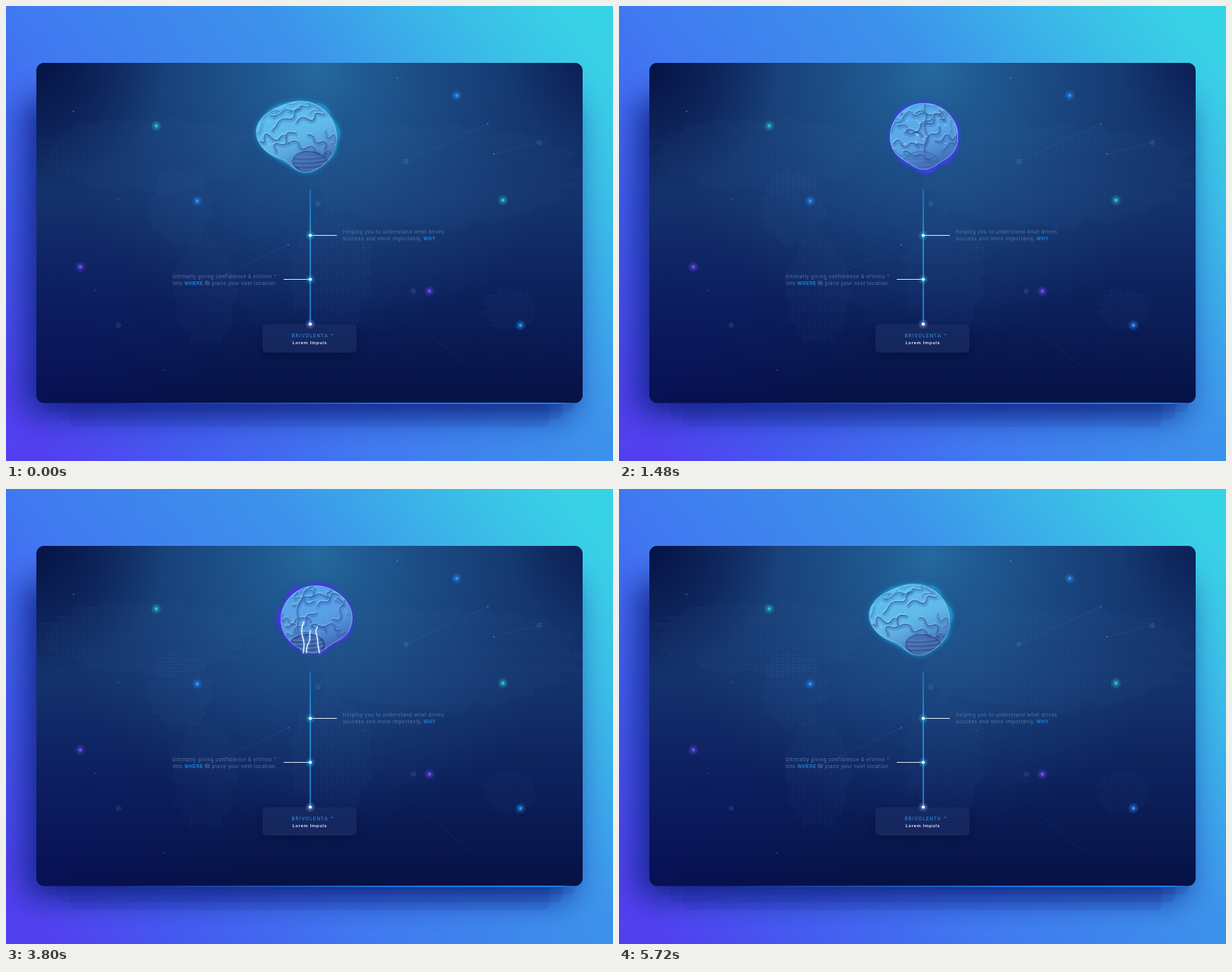
An HTML page with a canvas that plays this animation: 800x600 px, repeating every 5.76 s.

```html
<!DOCTYPE html>
<html lang="en">
<head>
<meta charset="utf-8">
<title>Brain timeline</title>
<style>
html, body { margin: 0; width: 100%; height: 100%; overflow: hidden; background: #3e80f0; }
canvas, svg { position: absolute; left: 0; top: 0; width: 800px; height: 600px; }
text { font-family: Roboto, Arial, sans-serif; font-size: 6.5px; letter-spacing: .63px; fill: #58749f; white-space: pre; }
.key { fill: #1f8ae0; font-weight: 500; }
.title { fill: #2b8fe8; letter-spacing: 1.05px; }
.sub { fill: #eef3ff; font-size: 6px; font-weight: 500; letter-spacing: .75px; }
</style>
</head>
<body>
<canvas id="stage" width="800" height="600"></canvas>
<svg viewBox="0 0 800 600">
  <text x="444" y="300">Helping you to understand what drives</text>
  <text x="444" y="309">success and more importanly, <tspan class="key">WHY</tspan></text>
  <text x="219.5" y="358.5">Ultimatly giving confidience &amp; elVirno ™</text>
  <text x="219.5" y="367.5">into <tspan class="key">WHERE</tspan> to place your next location.</text>
  <text class="title" x="376.5" y="437">BRIVOLENTA ™</text>
  <text class="sub" x="377.5" y="446.3">Lorem Impuls</text>
</svg>
<script>
const LOOP = 5760, TAU = Math.PI * 2, DEG = Math.PI / 180;
const ctx = document.getElementById('stage').getContext('2d');

const rgba = (c, a = 1) => `rgba(${c.map(Math.round).join(',')},${a})`;
const mix = (a, b, k) => a.map((v, i) => v + (b[i] - v) * k);

function seeded(seed) {
  return () => (seed = (seed * 16807) % 2147483647) / 2147483647;
}

function layer(w, h) {
  const c = document.createElement('canvas');
  c.width = w;
  c.height = h;
  return c;
}

function fade(g, stops) {
  stops.forEach(([at, color]) => g.addColorStop(at, color));
  return g;
}

const radial = (c, x, y, r, stops) => fade(c.createRadialGradient(x, y, 0, x, y, r), stops);
const linear = (c, x0, y0, x1, y1, stops) => fade(c.createLinearGradient(x0, y0, x1, y1), stops);

function disc(c, x, y, r, fill) {
  c.fillStyle = fill;
  c.beginPath();
  c.arc(x, y, r, 0, TAU);
  c.fill();
}

function glow(c, x, y, r, color, strength = 1) {
  disc(c, x, y, r, radial(c, x, y, r, [
    [0, rgba(color, strength)], [.35, rgba(color, .5 * strength)], [1, rgba(color, 0)]
  ]));
}

function box(c, x, y, w, h, r, fill) {
  c.fillStyle = fill;
  c.beginPath();
  c.roundRect(x, y, w, h, r);
  c.fill();
}

function segment(c, x0, y0, x1, y1, style, width) {
  c.strokeStyle = style;
  c.lineWidth = width;
  c.beginPath();
  c.moveTo(x0, y0);
  c.lineTo(x1, y1);
  c.stroke();
}

// ---- static scene ----

function drawBackdrop(c) {
  c.fillStyle = linear(c, 760, 30, 60, 590, [
    [0, 'rgb(56,210,230)'], [.12, 'rgb(58,191,231)'], [.34, 'rgb(60,147,235)'],
    [.64, 'rgb(64,120,241)'], [.85, 'rgb(68,90,240)'], [1, 'rgb(82,64,240)']
  ]);
  c.fillRect(0, 0, 800, 600);

  // the caster stays off stage, only its shadow is seen
  c.save();
  c.shadowColor = 'rgba(14,30,130,.85)';
  c.shadowBlur = 42;
  c.shadowOffsetX = 2000;
  box(c, 24 - 2000, 122, 722, 418, 16, '#000');
  c.restore();
  for (let i = 0; i < 3; i++) box(c, 50 + i * 17, 500, 700 - i * 34, 35 + i * 10, 8, 'rgba(14,30,120,.1)');
}

// continents: ragged ellipses of dots
function drawMap(c) {
  const cell = layer(3, 3);
  const p = cell.getContext('2d');
  p.fillStyle = 'rgba(100,160,215,.13)';
  p.fillRect(0, 0, 1.4, 1.4);
  c.fillStyle = c.createPattern(cell, 'repeat');
  const lands = [[185, 195, 140, 48], [230, 265, 42, 48], [262, 378, 42, 72],
                 [428, 350, 52, 80], [575, 222, 180, 68], [665, 400, 34, 27]];
  const rand = seeded(77);
  for (const [x, y, rx, ry] of lands) {
    c.beginPath();
    for (let a = 0; a < TAU; a += .12) {
      const k = .88 + .24 * rand();
      c.lineTo(x + Math.cos(a) * rx * k, y + Math.sin(a) * ry * k);
    }
    c.fill();
  }
}

function drawPanel(c) {
  c.save();
  c.beginPath();
  c.roundRect(40, 75, 720, 448.5, 10);
  c.clip();
  const wash = fill => {
    c.fillStyle = fill;
    c.fillRect(40, 75, 720, 450);
  };
  wash(linear(c, 0, 75, 0, 524, [
    [0, 'rgb(17,46,102)'], [.4, 'rgb(20,50,108)'], [.7, 'rgb(12,32,91)'], [1, 'rgb(6,17,69)']
  ]));
  wash(radial(c, 410, 85, 360, [
    [0, 'rgba(40,118,172,.82)'], [.45, 'rgba(36,98,155,.5)'], [1, 'rgba(30,75,135,0)']
  ]));
  wash(radial(c, 40, 75, 170, [[0, 'rgba(2,12,62,.8)'], [1, 'rgba(2,12,62,0)']]));
  wash(radial(c, 770, 75, 110, [[0, 'rgba(4,16,66,.5)'], [1, 'rgba(4,16,66,0)']]));
  wash(radial(c, 40, 500, 270, [[0, 'rgba(12,14,130,.24)'], [1, 'rgba(12,14,130,0)']]));
  drawMap(c);
  c.restore();
  c.fillStyle = linear(c, 140, 0, 755, 0, [
    [0, 'rgba(20,120,220,0)'], [.3, 'rgba(24,100,185,.7)'], [.6, 'rgb(22,125,235)'],
    [.95, 'rgb(28,138,250)'], [1, 'rgba(28,138,250,0)']
  ]);
  c.fillRect(140, 523, 615, 1.7);
}

function drawStars(c) {
  for (const l of [[635, 155, 527, 205], [643, 195, 703, 180], [372, 315, 265, 365], [555, 430, 612, 478]])
    segment(c, ...l, 'rgba(130,180,225,.13)', .7);
  [[89, 139], [516, 95], [635, 155], [643, 195], [372, 315], [148, 255], [118, 375], [208, 480], [471, 319]]
    .forEach(([x, y], i) => disc(c, x, y, .8, `rgba(150,200,240,${i < 5 ? .7 : .4})`));
  for (const [x, y] of [[703, 180], [527, 205], [411, 261], [148, 421], [537, 376], [265, 365]]) {
    c.strokeStyle = 'rgba(130,170,215,.4)';
    c.lineWidth = .7;
    c.beginPath();
    c.arc(x, y, 2.8, 0, TAU);
    c.stroke();
    disc(c, x, y, .8, 'rgba(160,200,235,.5)');
  }
  const teal = [30, 185, 195], blue = [30, 135, 245], violet = [100, 62, 235];
  for (const [x, y, color] of [[198, 158, teal], [594, 118, blue], [252, 257, blue], [655, 256, teal],
                               [98, 344, violet], [558, 376, violet], [678, 421, blue]]) {
    glow(c, x, y, 7.5, color);
    disc(c, x, y, 1.9, rgba(mix(color, [255, 255, 255], .15), .8));
  }
}

function drawTimeline(c) {
  c.save();
  c.shadowColor = 'rgba(2,10,50,.5)';
  c.shadowBlur = 14;
  c.shadowOffsetY = 5;
  box(c, 338, 419.5, 124, 37.5, 5, linear(c, 0, 419, 0, 457, [[0, 'rgb(20,42,98)'], [1, 'rgb(23,37,93)']]));
  c.restore();

  segment(c, 401, 242, 401, 419, linear(c, 0, 242, 0, 419, [
    [0, 'rgba(25,130,210,.85)'], [.35, 'rgb(32,165,230)'], [1, 'rgb(45,135,225)']
  ]), 1.5);
  segment(c, 401, 302.5, 436, 302.5, 'rgba(240,248,255,.9)', 1.2);
  segment(c, 366, 360.5, 401, 360.5, 'rgba(240,248,255,.9)', 1.2);
  for (const y of [302.5, 360.5, 419.5]) {
    glow(c, 401, y, 7, y > 400 ? [130, 170, 255] : [35, 190, 235], .9);
    disc(c, 401, y, 2.1, '#f4fbff');
  }
}

const scene = layer(800, 600);
[drawBackdrop, drawPanel, drawStars, drawTimeline].forEach(draw => draw(scene.getContext('2d')));

// ---- turning brain ----

const CYAN = [30, 150, 208], BLUE = [50, 75, 246], VIOLET = [100, 30, 243];
const PULSES = [920, 2840, 3800, 4600];
const rand = seeded(4127);

// grooves wander in longitude and latitude, mostly front to back
const grooves = Array.from({ length: 34 }, (_, n) => {
  let lon = n * 2.39996, lat = Math.asin(.95 - 1.5 * n / 34);
  const start = (rand() - .5) * 1.6, bend = (rand() - .5) * .16;
  return Array.from({ length: 14 }, (_, i) => {
    const dir = start + bend * i + Math.sin(i * .9 + n) * .9;
    lon += Math.cos(dir) * .09 / Math.max(.3, Math.cos(lat));
    lat += Math.sin(dir) * .09;
    return [lon, lat];
  });
});
// the cleft between the halves
for (const side of [-1, 1])
  grooves.push(Array.from({ length: 22 }, (_, i) => [side * Math.PI / 2 + Math.sin(i * .9) * .04, 1.5 - i * .095]));

const sparks = Array.from({ length: 12 }, () => [-1.6 + (rand() - .5) * 2.6, (rand() - .3) * 1.1]);

// each bolt climbs from the stem in a random zigzag
const bolts = PULSES.map(() => Array.from({ length: 3 }, (_, n) => {
  let x = 391 + n * 8;
  const height = 22 + rand() * 45;
  return Array.from({ length: 5 }, (_, i) => [x += (rand() - .42) * 11, 216 - height * i / 4]);
}));

// side is 1 facing left and -1 facing right
function poseAt(t) {
  const turn = t / LOOP * TAU, side = Math.cos(turn);
  return {
    turn, side, x: 401.5 - 13 * side, y: 173,
    aura: side > .4 ? mix(BLUE, CYAN, (side - .4) / .6) : mix(VIOLET, BLUE, (side + 1) / 1.4),
    skin: mix([84, 152, 230], [96, 188, 234], (side + 1) / 2)
  };
}

function bump(angle, at, width) {
  const d = Math.atan2(Math.sin(angle - at), Math.cos(angle - at)) / width;
  return Math.exp(-d * d);
}

// a ball with a brow in front and a hollow under it
function radiusAt(pose, a) {
  const face = b => 12 * pose.side ** 2 * bump(b, -12 * DEG, 32 * DEG) - 10 * bump(b, 57 * DEG, 27 * DEG);
  const left = (1 + pose.side) / 2;
  return 45 + 2.5 * pose.side ** 2 + left * face(Math.PI - a) + (1 - left) * face(a);
}

function outline(pose, grow = 0, wobble = 0) {
  ctx.beginPath();
  for (let i = 0; i < 72; i++) {
    const a = i / 72 * TAU;
    const r = radiusAt(pose, a) + grow + wobble * Math.sin(a * 5 + pose.turn * 2) * Math.sin(a * 2 - pose.turn * 2);
    ctx.lineTo(pose.x + Math.cos(a) * r, pose.y + Math.sin(a) * r);
  }
  ctx.closePath();
}

function project(pose, [lon, lat]) {
  const x = Math.cos(lat) * Math.sin(lon + pose.turn), y = -Math.sin(lat);
  const a = Math.atan2(y, x), r = Math.hypot(x, y) * radiusAt(pose, a);
  return [pose.x + Math.cos(a) * r, pose.y + Math.sin(a) * r, Math.cos(lat) * Math.cos(lon + pose.turn)];
}

function smoothPath(pts) {
  ctx.beginPath();
  ctx.moveTo(pts[0][0], pts[0][1]);
  for (let i = 1; i < pts.length - 1; i++) {
    const [x, y] = pts[i], [nx, ny] = pts[i + 1];
    ctx.quadraticCurveTo(x, y, (x + nx) / 2, (y + ny) / 2);
  }
}

function strokePath(pts, style, width) {
  smoothPath(pts);
  ctx.strokeStyle = style;
  ctx.lineWidth = width;
  ctx.stroke();
}

// a halo with two lobes that circle with the turn
function drawAura(pose) {
  ctx.save();
  ctx.shadowColor = rgba(pose.aura, .9);
  ctx.shadowBlur = 7;
  outline(pose, 1.5, 1.6);
  ctx.fillStyle = rgba(pose.aura, .65);
  ctx.fill();
  for (const lag of [8, 52]) {
    const a = pose.turn - lag * DEG, r = radiusAt(pose, a) - 12;
    disc(ctx, pose.x + Math.cos(a) * r, pose.y + Math.sin(a) * r, 17, rgba(pose.aura, .6));
  }
  ctx.restore();
}

function drawCerebellum(pose) {
  const x = 398 + 3 * pose.side, y = 206;
  ctx.save();
  ctx.globalAlpha = .62 - .4 * Math.sin(pose.turn);
  ctx.beginPath();
  ctx.ellipse(x, y, 23, 14, .12 * pose.side, 0, TAU);
  ctx.fillStyle = 'rgb(62,96,164)';
  ctx.fill();
  ctx.strokeStyle = 'rgba(18,36,92,.8)';
  ctx.lineWidth = 1.3;
  ctx.stroke();
  ctx.clip();
  for (let i = -5; i < 6; i++) {
    ctx.lineWidth = .8;
    ctx.strokeStyle = i % 2 ? 'rgba(150,185,235,.5)' : 'rgba(20,40,95,.6)';
    ctx.beginPath();
    ctx.ellipse(x - 8, y + i * 2.7, 34, 7, 0, 0, Math.PI);
    ctx.stroke();
  }
  ctx.restore();
}

function drawBrain(pose) {
  const { x, y, skin } = pose;
  const ridge = mix(skin, [225, 245, 255], .45);
  drawAura(pose);
  ctx.save();
  outline(pose);
  ctx.fillStyle = rgba(skin);
  ctx.fill();
  ctx.clip();
  ctx.lineCap = ctx.lineJoin = 'round';

  for (const path of grooves) {
    const run = path.map(p => project(pose, p)).filter(p => p[2] > .08);
    if (run.length < 3) continue;
    const depth = Math.min(1, run[run.length >> 1][2] * 1.5);
    strokePath(run.map(([px, py]) => [px + .6, py + 1.6]), `rgba(40,84,165,${.28 * depth})`, 5);
    strokePath(run.map(([px, py]) => [px - .8, py - 1.6]), rgba(ridge, .5 * depth), 2);
    strokePath(run, `rgba(26,62,132,${.62 * depth})`, 1.4);
  }
  ctx.fillStyle = linear(ctx, x - 20, y - 45, x + 20, y + 48, [
    [0, 'rgba(70,200,255,.3)'], [.4, 'rgba(110,170,225,.08)'],
    [.72, 'rgba(60,80,165,.4)'], [1, 'rgba(28,42,115,.7)']
  ]);
  ctx.fillRect(x - 70, y - 60, 140, 120);
  drawCerebellum(pose);

  outline(pose);
  ctx.strokeStyle = rgba(ridge, .45);
  ctx.lineWidth = 2.2;
  ctx.stroke();
  for (const s of sparks) {
    const [px, py, z] = project(pose, s);
    if (z > 0) disc(ctx, px, py, 1, `rgba(205,240,255,${.75 * z})`);
  }
  ctx.restore();
}

function drawBolts(t) {
  ctx.save();
  ctx.lineCap = ctx.lineJoin = 'round';
  ctx.shadowColor = 'rgb(110,190,255)';
  ctx.shadowBlur = 4;
  PULSES.forEach((at, i) => {
    const dt = t - at, power = Math.min(1, 1.7 * (1 - Math.abs(dt) / 520));
    if (power <= 0) return;
    ctx.globalAlpha = power;
    for (const bolt of bolts[i]) strokePath(bolt.map(([x, y]) => [x + dt * .008, y]), '#f2faff', 1.4);
  });
  ctx.restore();
}

function frame(now) {
  const t = now % LOOP;
  ctx.drawImage(scene, 0, 0);
  drawBrain(poseAt(t));
  drawBolts(t);
  requestAnimationFrame(frame);
}
frame(0);
</script>
</body>
</html>
```
